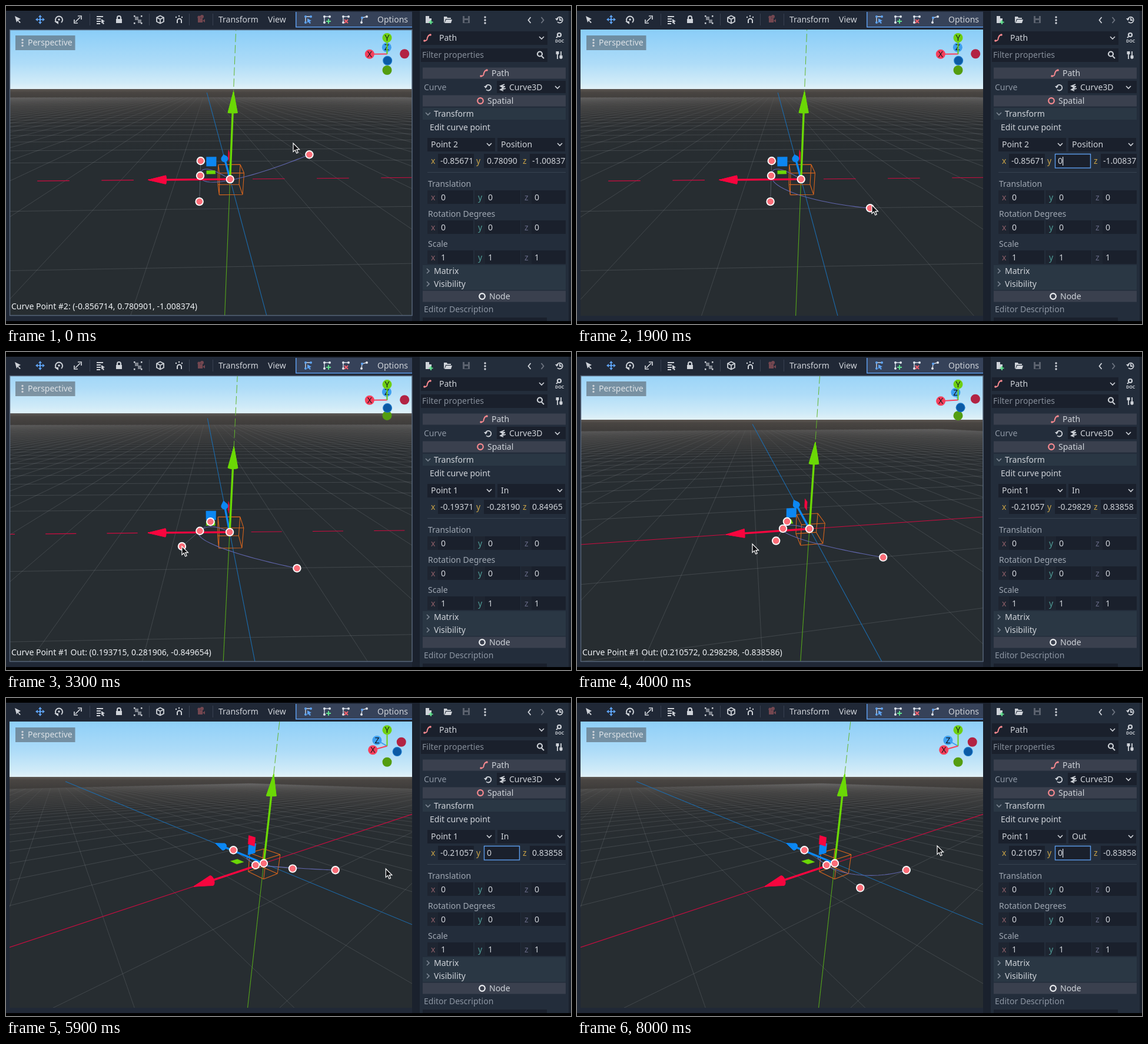
An HTML page with a canvas that plays this animation: 960 px wide and 540 px high, repeating every 8100 ms.

```html
<!DOCTYPE html>
<html lang="en">
<head>
<meta charset="utf-8">
<title>Curve point editing</title>
<style>
html, body { margin: 0; width: 100%; height: 100%; overflow: hidden; background: #1a202c; }
canvas, svg { position: absolute; left: 0; top: 0; width: 960px; height: 540px; }
text { font: 14px "Noto Sans", "Open Sans", sans-serif; white-space: pre; }
</style>
</head>
<body>
<canvas id="view" width="960" height="540"></canvas>
<svg id="ui" viewBox="0 0 960 540"></svg>
<script>
const LOOP = 8100, STEP = 100;
const INK = '#cfd3d9', DIM = '#8d96a3', BLUE = '#5c9cec', FIELD = '#1a202c', PANEL = '#232d3b', BAR = '#3a404e';
const $ = id => document.getElementById(id);
const ctx = $('view').getContext('2d');

// ---------- static interface ----------
const rect = (x, y, w, h, fill, more = '') => `<rect x="${x}" y="${y}" width="${w}" height="${h}" fill="${fill}" ${more}/>`;
const text = (x, y, s, fill = INK, more = '') => `<text x="${x}" y="${y + 5}" fill="${fill}" ${more}>${s}</text>`;
const line = (d, c = INK, w = 2, more = '') => `<path d="${d}" fill="none" stroke="${c}" stroke-width="${w}" ${more}/>`;
const fill = (d, c = INK) => `<path d="${d}" fill="${c}"/>`;
const dot = (x, y, r, c, more = '') => `<circle cx="${x}" cy="${y}" r="${r}" fill="${c}" ${more}/>`;
const ring = (x, y, c, r = 4.8) => dot(x, y, r, 'none', `stroke="${c}" stroke-width="2.2"`);
const down = (x, y, c = INK, id = '') => line(`M${x - 4} ${y - 2}l4 4 4-4`, c, 1.6, id);
const dots = (x, y) => [-5, 0, 5].map(d => dot(x, y + d, 1.7, INK)).join('');
const pathIcon = (x, y) => line(`M${x - 5} ${y + 5}c6 0 4-3 5-5s1-5 5-5`, '#f98a90', 2) +
  dot(x - 5, y + 5, 1.8, '#f98a90') + dot(x + 5, y - 5, 1.8, '#f98a90');
const curveTool = (x, c, mark) => line(`M${x - 4} 28V18h9`, '#cdd6e4', 1.4) + dot(x - 4, 28, 2, c) +
  dot(x - 4, 18, 2, c) + dot(x + 5, 18, 2, c) + mark;

function toolbar() {
  let s = rect(0, 8, 703, 32, '#202836') + rect(0, 40, 6, 486, '#202836') + rect(0, 526, 703, 9, '#202836') +
    rect(690, 40, 13, 495, '#1a212d') + rect(690, 8, 13, 32, '#1a212d');
  s += rect(492, 10, 198, 26, '#364259') + rect(492, 10, 1.5, 26, BLUE) + rect(492, 35, 198, 1.5, BLUE);
  s += fill('M15 17l10 5-4 2 4 4-2 1-3-4-2 3z');
  s += line('M58 17v12M52 23h12', '#5fa4f5', 1.6) +
    fill('M58 15l3 4h-6zM58 31l3-4h-6zM50 23l4-3v6zM66 23l-4-3v6z', '#5fa4f5') + dot(58, 23, 2, '#5fa4f5');
  s += line('M86 28A6 6 0 1 1 94 28') + fill('M82 26h7v5z') + dot(90, 23, 1.8, INK);
  s += line('M118 27l8-8M122 17h6v6M116 23v6h6', INK, 1.7);
  s += line('M154 18h11M154 22h7M154 26h7M154 30h6', INK, 1.8) + fill('M162 22l6 4-3 1 2 3-2 1-2-3-1 2z');
  s += rect(187, 22, 10, 7, INK) + line('M189 22v-2a3 3 0 0 1 6 0v2');
  s += rect(219, 18, 6, 6, '#7d838d') + rect(224, 23, 6, 6, '#7d838d') +
    [[217, 16], [229, 16], [217, 28], [229, 28]].map(p => rect(p[0], p[1], 2.5, 2.5, INK)).join('');
  s += line('M262 16.500l6 3v7l-6 3-6-3v-7zM256 19.500l6 3 6-3M262 22.500v7', INK, 1.8);
  s += line('M291 29v-4a3.500 3.500 0 0 1 7 0v4', INK, 2) + [[289, 19], [294, 17], [299, 19]].map(p => dot(p[0], p[1], 1.2, INK)).join('');
  s += rect(326, 21, 8, 7, '#744750') + fill('M334 25l4-3v6l-4-3z', '#744750') + dot(328, 19, 2.6, '#744750') + dot(333, 18, 3, '#744750');
  for (const x of [142, 243, 311, 351]) s += rect(x, 13, 1, 20, '#394150');
  s += text(361, 23, 'Transform') + text(445, 23, 'View') + text(631, 23, 'Options');
  s += curveTool(513, '#5fa4f5', fill('M512 21l7 4-3 1 2 3-2 1-2-3-2 2z', '#5fa4f5'));
  s += curveTool(545, '#dfe5ee', line('M548 22v8M544 26h8', '#5fe08b', 2));
  s += curveTool(577, '#dfe5ee', line('M575 23l6 6M581 23l-6 6', '#f5606c', 2));
  s += line('M604 28l1-8 8-2', '#cdd6e4', 1.4) + dot(604, 28, 2, '#dfe5ee') + dot(605, 20, 2, '#5fa4f5') + dot(613, 18, 2, '#dfe5ee');
  s += rect(16, 50, 101.5, 25, 'rgba(90,100,110,.62)') + dots(28, 62.5) + text(37, 62, 'Perspective', '#dde2e7');
  return s;
}

function vecRow(y, v) {
  const cols = [['x', '#8c5f68', 716], ['y', '#4f9c96', 796], ['z', '#666985', 875]];
  return cols.map(([n, c, x], i) => rect(x, y - 12, i == 2 ? 76 : 78, 23, FIELD) + rect(x, y - 12, 18, 23, '#1e2531') +
    text(x + 6, y, n, c) + text(x + 23, y, v)).join('');
}

function inspector() {
  let s = rect(703, 8, 253, 527, PANEL) + rect(956, 8, 4, 527, '#1a212d');
  s += fill('M713 17h6v4h4v8h-10z') + line('M722 24v7M718.500 27.500h7', '#5fe08b', 2);
  s += fill('M744 18h5l1 2h6v2h-9l-2 6h-1zM748 23h10l-2 6h-11z');
  s += rect(776, 17, 12, 12, '#5b626e') + rect(779, 17, 6, 4, PANEL) + rect(779, 24, 6, 4, PANEL);
  s += dots(814, 24) + line('M891.500 19l-4 5 4 5', INK, 1.8) + line('M909.500 19l4 5-4 5', '#6d7480', 1.8);
  s += line('M937 27a5 5 0 1 0-1-5M941 20v4h3', INK, 1.8) + fill('M933 21h6l-3 4z');
  s += rect(705, 43, 215, 23, FIELD) + pathIcon(716, 54) + text(736, 54, 'Path') + down(910, 54);
  s += ring(940, 49, INK, 3) + line('M937 52l-2 2', INK, 2) + `<text x="933" y="62" fill="${INK}" style="font-size:7px;font-weight:700">DOC</text>`;
  s += rect(705, 72, 215, 23, FIELD) + text(707, 83, 'Filter properties', '#858d99') + ring(907, 81.500, INK, 4) + line('M910 85l4 4');
  s += line('M937 77v13M943 77v13', INK, 1.8) + rect(934.500, 77, 5, 5, INK) + rect(940.500, 84, 5, 5, INK);
  for (const y of [114, 161, 493]) s += rect(708, y - 9.500, 243, 19, BAR);
  s += pathIcon(812, 114) + text(825, 114, 'Path') + ring(806, 161, '#f98a90') + text(818, 161, 'Spatial');
  s += text(710, 138, 'Curve', DIM) + rect(834, 127, 117, 21, FIELD) + line('M816 142a4.800 4.800 0 1 0-1-5', INK, 1.8) + fill('M812 136h6l-3 4z');
  s += line('M847 133l-7 3 5 3-5 3 5 2M840 136l8 1M842 142l7-2', INK, 1.8) + text(855, 138, 'Curve3D') + down(937, 138);
  for (const y of [183, 450, 472]) s += rect(708, y - 10, 243, y == 450 ? 22 : 20, '#2a3744');
  s += down(717, 183, '#7d8793') + text(727, 183, 'Transform') + text(720, 206, 'Edit curve point');
  s += rect(716, 224, 115, 23, FIELD) + rect(835, 224, 115, 23, FIELD) + down(821, 235);
  [['x', 722, 734], ['y', 799, 812], ['z', 878, 890]].forEach(([n, x, f]) =>
    s += rect(f, 251, 61, 24, FIELD) + text(x, 263, n, '#c9a347'));
  s += rect(716, 282, 235, 1, '#374250');
  [['Translation', 302, 0], ['Rotation Degrees', 353, 0], ['Scale', 404, 1]].forEach(([n, y, v]) =>
    s += text(717, y, n, '#9fa7b2') + vecRow(y + 23, v));
  [['Matrix', 450], ['Visibility', 472]].forEach(([n, y]) =>
    s += line(`M715 ${y - 4}l4 4-4 4`, '#7d8793', 1.6) + text(727, y, n));
  s += ring(809, 493, '#eef0f3') + text(821, 493, 'Node') + text(710, 515, 'Editor Description', DIM);
  return s + rect(708, 529, 211, 6, FIELD);
}

function menu() {
  let s = rect(836, 247.500, 114, 76.500, '#232c3a', 'stroke="#587cb0"') + rect(839, 275, 106, 22, '#181e29');
  [['Position', 264], ['In', 286], ['Out', 309]].forEach(([n, y]) => s += dot(851.500, y, 7, n == 'In' ? BLUE : '#454b57') +
    (n == 'In' ? dot(851.500, y, 4, '#fff') : '') + text(862, y, n));
  return s;
}

$('ui').innerHTML = toolbar() + inspector() +
  text(722, 235, '', INK, 'id="point"') + text(841, 235, '', INK, 'id="mode"') + down(941, 235, INK, 'id="arrow"') +
  text(738, 263, '', INK, 'id="vx"') + text(817, 263, '', INK, 'id="vy"') + text(894, 263, '', INK, 'id="vz"') +
  rect(812.500, 251.500, 60, 23.500, 'none', `id="box" stroke="${BLUE}" stroke-width="1.4"`) +
  rect(825, 256, 1.2, 15, '#e4e8ee', 'id="caret"') +
  `<g id="menu">${rect(836, 224, 114, 23, 'none', `stroke="${BLUE}" stroke-width="1.4"`)}${menu()}</g>` +
  rect(6.500, 40.500, 683.500, 485, 'none', 'id="frame" stroke="#566478" stroke-width="1.5"') +
  text(9, 510, '', '#eef1f4', 'id="status"') +
  rect(0, 0, 960, 8, '#000') + rect(0, 535, 960, 5, '#000') +
  `<path id="pointer" d="M0 0V14.500L3.400 11.400 5.700 17 8.200 16 5.900 10.600H10.500Z" fill="#0c0e11" stroke="#fff" stroke-width="1.2"/>` +
  `<g id="beam" fill="none">${line('M-4-7.500h3l1 1 1-1h3M0-6.500v13M-4 7.500h3l1-1 1 1h3', '#fff', 3)}${line('M-4-7.500h3l1 1 1-1h3M0-6.500v13M-4 7.500h3l1-1 1 1h3', '#111', 1.2)}</g>`;

// ---------- camera ----------
const F = 346, CX = 348, CY = 283, DIST = 5.24, FOCUS = [.324, -.449, 1.42];
let cam;
const rad = d => d * Math.PI / 180;
function setCam(yaw, pitch) {
  cam = { cy: Math.cos(rad(yaw)), sy: Math.sin(rad(yaw)), cp: Math.cos(rad(pitch)), sp: Math.sin(rad(pitch)),
    horizon: CY - F * Math.tan(rad(pitch)) };
}
// direction in view space: right, up, depth
function turn([x, y, z]) {
  const h = z * cam.cy - x * cam.sy;
  return [-x * cam.cy - z * cam.sy, y * cam.cp + h * cam.sp, h * cam.cp - y * cam.sp];
}
function toView(p) {
  const v = turn(p.map((c, i) => c - FOCUS[i]));
  v[2] += DIST;
  return v;
}
const flat = v => [CX + F * v[0] / v[2], CY - F * v[1] / v[2]];
const project = p => flat(toView(p));
const mix = (a, b, k) => a.map((c, i) => c + (b[i] - c) * k);
const add = (a, b) => a.map((c, i) => c + b[i]);
const neg = a => a.map(c => -c);
const along = (i, n) => [0, 1, 2].map(k => k == i ? n : 0);

function segment(a, b) {
  let p = toView(a), q = toView(b);
  const near = .05;
  if (p[2] < near && q[2] < near) return;
  if (p[2] < near) p = mix(p, q, (near - p[2]) / (q[2] - p[2]));
  if (q[2] < near) q = mix(q, p, (near - q[2]) / (p[2] - q[2]));
  ctx.moveTo(...flat(p));
  ctx.lineTo(...flat(q));
  return [flat(p), flat(q)];
}
function stroke(color, width, draw) {
  ctx.beginPath();
  draw();
  ctx.strokeStyle = color;
  ctx.lineWidth = width;
  ctx.stroke();
}
function polygon(pts, color) {
  ctx.beginPath();
  pts.forEach(p => ctx.lineTo(...p));
  ctx.closePath();
  ctx.fillStyle = ctx.strokeStyle = color;
  ctx.lineWidth = .5;
  ctx.fill();
  ctx.stroke();
}
function disc(x, y, r, color) {
  ctx.beginPath();
  ctx.arc(x, y, r, 0, 7);
  ctx.fillStyle = color;
  ctx.fill();
}
function ramp(y0, y1, stops) {
  const g = ctx.createLinearGradient(0, y0, 0, y1);
  stops.forEach(([k, c]) => g.addColorStop(k, c));
  return g;
}

// ---------- viewport ----------
const AXIS = ['#f7063f', '#6bd806', '#0c87f2'];

function backdrop() {
  const h = cam.horizon;
  ctx.fillStyle = ramp(h, h - 110, [[0, '#e2f2f8'], [.1, '#d0ebf8'], [.4, '#aedcf8'], [1, '#84cbf8']]);
  ctx.fillRect(6, 40, 684, h - 40);
  ctx.fillStyle = ramp(h, h + 110, [[0, '#5d5853'], [.05, '#494542'], [.25, '#383736'], [.6, '#2b2f32'], [1, '#272d31']]);
  ctx.fillRect(6, h, 684, 526 - h);
  const grid = ramp(h, h + 110, [[0, 'rgba(190,195,200,0)'], [.12, 'rgba(190,195,200,.05)'], [.5, 'rgba(190,195,200,.13)'], [1, 'rgba(190,195,200,.17)']]);
  stroke(grid, 1, () => {
    for (let k = -40; k <= 40; k++) if (k) {
      segment([k, 0, -40], [k, 0, 40]);
      segment([-40, 0, k], [40, 0, k]);
    }
  });
}

function axes() {
  // nearly level lines break up into one dash per pixel row
  for (const side of [1, -1]) stroke('#cf0b40', 1.1, () => {
    const [a, b] = segment([0, 0, 0], [side * 100, 0, 0]);
    const run = Math.abs((b[0] - a[0]) / (b[1] - a[1]));
    if (run > 30) {
      ctx.setLineDash([run / 2, run / 2]);
      ctx.lineDashOffset = run * (side > 0 ? .5 : .65);
    }
  });
  ctx.setLineDash([]);
  stroke('#1c6cae', 1.1, () => segment([0, 0, -100], [0, 0, 100]));
  stroke('#55a51c', 1.1, () => segment([0, -100, 0], [0, 0, 0]));
  ctx.setLineDash([14, 5]);
  stroke('#62b52c', 1, () => segment([0, 0, 0], [0, 3.2, 0]));
  ctx.setLineDash([]);
}

function cube(s) {
  stroke('#d9651c', 1.1, () => {
    for (let i = 0; i < 3; i++) for (const u of [-s, s]) for (const v of [-s, s]) {
      const a = [];
      a[i] = -s; a[(i + 1) % 3] = u; a[(i + 2) % 3] = v;
      const b = a.slice();
      b[i] = s;
      segment(a, b);
    }
  });
}

function moveGizmo() {
  const size = toView([0, 0, 0])[2];
  for (const i of [2, 0, 1]) {
    const j = (i + 1) % 3, k = (i + 2) % 3, lo = size * .069, hi = size * .115;
    polygon([[lo, lo], [hi, lo], [hi, hi], [lo, hi]].map(([u, v]) => project(add(along(j, u), along(k, v)))), AXIS[i]);
  }
  for (const i of [2, 0, 1]) {
    const j = (i + 1) % 3, k = (i + 2) % 3, base = along(i, size * .315), r = size * .0208;
    stroke(AXIS[i], 3.4, () => segment([0, 0, 0], base));
    const rim = Array.from({ length: 16 }, (_, n) => project(add(base,
      add(along(j, r * Math.cos(n * Math.PI / 8)), along(k, r * Math.sin(n * Math.PI / 8))))));
    const tip = project(along(i, size * .399));
    rim.forEach((p, n) => polygon([tip, p, rim[(n + 1) % 16]], AXIS[i]));
    polygon(rim, AXIS[i]);
  }
}

function viewGizmo() {
  const ox = 647.5, oy = 81.5;
  const pos = ['#f73f5c', '#6fd012', '#3d9ff0'], low = ['#b22343', '#549d10', '#0c5aa4'], rim = ['#b22343', '#549d10', '#1c79cc'];
  const list = [];
  for (let i = 0; i < 3; i++) for (const sign of [1, -1]) list.push({ i, sign, v: turn(along(i, sign * 29.7)) });
  list.sort((a, b) => b.v[2] - a.v[2]);
  for (const { i, sign, v } of list) {
    const x = ox + v[0], y = oy - v[1];
    if (sign > 0) stroke(pos[i], 2, () => { ctx.moveTo(ox, oy); ctx.lineTo(x, y); });
    disc(x, y, 8, sign > 0 ? pos[i] : rim[i]);
    if (sign < 0) disc(x, y, 6.8, low[i]);
    else {
      ctx.fillStyle = '#15191d';
      ctx.font = '14px "Noto Sans", sans-serif';
      ctx.textAlign = 'center';
      ctx.fillText('XYZ'[i], x, y + 5);
    }
  }
}

const P1 = [.5404, .189, -.2636];
function curve(s) {
  const a = add(P1, s.in), b = add(P1, s.out);
  stroke('rgba(150,160,175,.4)', 1, () => { segment(P1, a); segment(P1, b); });
  const part = (p, q, r, e) => {
    for (let k = 0; k <= 30; k++) {
      const t = k / 30, u = 1 - t;
      const pt = p.map((c, i) => u * u * u * c + 3 * u * u * t * q[0][i] + 3 * u * t * t * r[i] + t * t * t * e[i]);
      ctx[k ? 'lineTo' : 'moveTo'](...project(pt));
    }
  };
  const zero = [0, 0, 0];
  stroke('#6166ad', 1.1, () => { part(zero, [zero], a, P1); part(P1, [b], s.end, s.end); });
  return [a, b, P1, s.end, zero];
}

function drawView(s) {
  ctx.clearRect(0, 0, 960, 540);
  ctx.save();
  ctx.beginPath();
  ctx.rect(6, 40, 684, 486);
  ctx.clip();
  backdrop();
  axes();
  cube(.21);
  const knobs = curve(s);
  moveGizmo();
  for (const p of knobs) {
    const [x, y] = project(p);
    disc(x, y, 7.2, '#fff');
    disc(x, y, 5.3, '#fb6d78');
  }
  viewGizmo();
  ctx.restore();
}

// ---------- timeline ----------
const CAM = [[0, 1.28, 22.3], [1900, 1.28, 22.3], [2300, 1.06, 27.3], [3600, 1.06, 27.3], [4000, 8, 25.9],
  [4400, 35.2, 21], [5300, 35.2, 21], [5700, 35.2, 23.3]];
const MOUSE = [[0, 488, 233], [200, 488, 233], [700, 845, 263], [1300, 845, 263], [1700, 501, 338], [2400, 501, 338],
  [2700, 327, 363], [3400, 298, 326], [4400, 298, 326], [4700, 841, 266], [5100, 841, 266], [5300, 600, 300],
  [5800, 600, 300], [6200, 890, 236], [6300, 890, 236], [6600, 885, 291], [6700, 885, 291], [6900, 880, 309],
  [7200, 843, 264], [7700, 843, 264], [8000, 612, 251]];
const ease = k => k * k * (3 - 2 * k);
function at(table, t, curveFn = k => k) {
  const n = table.findIndex(r => r[0] > t);
  if (n < 0) return table[table.length - 1].slice(1);
  const a = table[n - 1], b = table[n];
  return mix(a, b, curveFn((t - a[0]) / (b[0] - a[0]))).slice(1);
}
const within = (t, a, b) => t >= a && t < b;
const number = v => v ? v.toFixed(6).slice(0, -1) : '0';
const show = (id, on) => $(id).style.display = on ? '' : 'none';
const put = (id, s) => $(id).textContent = s;

function render(t) {
  setCam(...at(CAM, t));
  const drag = ease(Math.min(1, Math.max(0, (t - 2800) / 600)));
  const tangent = mix([.017, -.077, .988], [-.210572, -.298298, .838586], drag);
  const s = { in: tangent.slice(), out: neg(tangent), end: [-.856714, t < 1300 ? .780901 : 0, -1.008374] };
  if (t >= 5200) s.in[1] = 0;
  if (t >= 7700) s.out[1] = 0;
  drawView(s);

  const first = t >= 2800, mode = !first ? 'Position' : t < 6900 ? 'In' : 'Out';
  const vec = { Position: s.end, In: s.in, Out: s.out }[mode];
  const typed = within(t, 900, 1300) || within(t, 5000, 5200) || within(t, 7600, 7700);
  put('point', first ? 'Point 1' : 'Point 2');
  put('mode', mode);
  put('vx', number(vec[0]));
  put('vy', typed ? '0' : number(vec[1]));
  put('vz', number(vec[2]));

  const open = within(t, 6300, 6900);
  show('menu', open);
  $('mode').setAttribute('fill', open ? BLUE : INK);
  $('arrow').setAttribute('stroke', open ? BLUE : INK);
  show('box', within(t, 700, 2800) || within(t, 4700, 6300) || t >= 7200);
  show('frame', t < 700 || within(t, 2800, 4700));
  const since = within(t, 900, 2800) ? t - 900 : within(t, 5000, 6300) ? t - 5000 : t >= 7600 ? t - 7600 : -1;
  show('caret', since >= 0 && Math.floor(since / 500) % 2 == 0);

  const six = v => '(' + v.map(c => c.toFixed(6)).join(', ') + ')';
  put('status', t < 900 ? 'Curve Point #2: ' + six(s.end) : within(t, 2800, 5200) ? 'Curve Point #1 Out: ' + six(s.out) : '');

  const [mx, my] = within(t, 2700, 3400) ? project(add(P1, s.out)) : at(MOUSE, t, ease);
  const overField = !open && mx > 812 && mx < 873 && my > 251 && my < 276;
  show('beam', overField);
  show('pointer', !overField);
  $(overField ? 'beam' : 'pointer').setAttribute('transform', `translate(${mx} ${my})`);
}

let start, last = -1;
function tick(now) {
  start ??= now;
  const t = Math.floor((now - start) % LOOP / STEP) * STEP;
  if (t != last) render(last = t);
  requestAnimationFrame(tick);
}
render(0);
requestAnimationFrame(tick);
</script>
</body>
</html>
```
